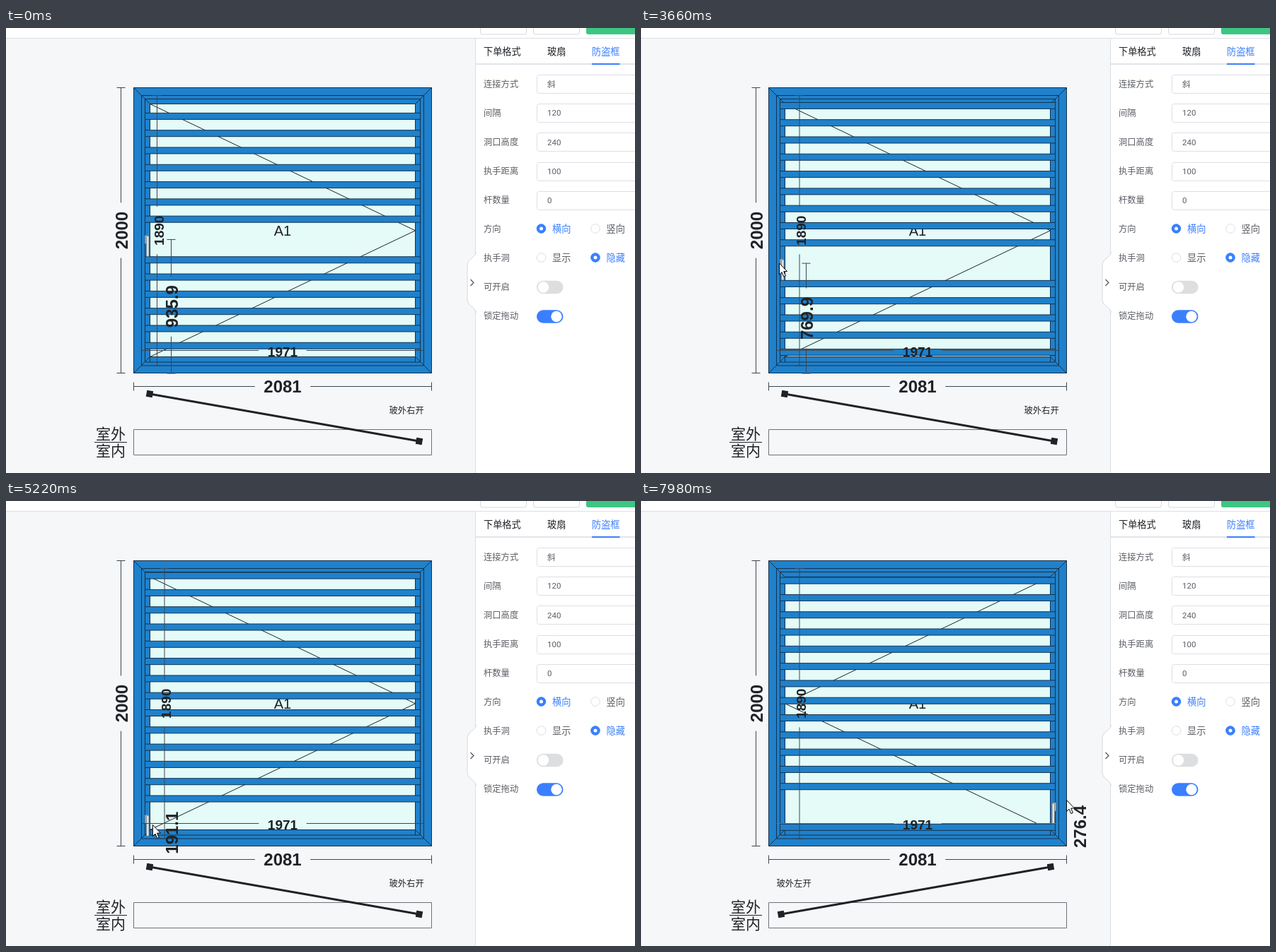
Animation, 889 px wide and 630 px high, one loop 8 s. Source, as an HTML page with a canvas:

```html
<!DOCTYPE html>
<html lang="zh">
<head>
<meta charset="utf-8">
<style>
html, body { margin: 0; width: 100%; height: 100%; overflow: hidden; background: #f6f7f9; }
canvas { display: block; }
</style>
</head>
<body>
<canvas id="stage" width="889" height="630"></canvas>
<script>
const ctx = document.getElementById('stage').getContext('2d');
const LOOP = 8000, STEP = 60;
const PX_PER_MM = 0.2025, BOTTOM = 489;
const PITCH = 120 * PX_PER_MM, BAR = 9;
const INK = '#1f2226', LINE = '#16324a', BLUE = '#1f81cc', GLASS = '#e4fbf8', ACCENT = '#3a7fff';
const DIGITS = '"Liberation Sans", Arial, sans-serif';
const CJK = '"Noto Sans CJK SC", "Noto Sans CJK", sans-serif';

// Keyframes: [time, value...]
const cursorKeys = [[120, 690, 87], [540, 400, 225], [900, 215, 300], [1380, 200, 300], [2400, 198, 301],
  [2880, 208, 305], [3000, 208, 305], [3240, 197, 320], [3420, 196, 323], [3660, 195, 332.5], [4140, 197, 372],
  [4740, 205, 427], [5040, 206, 446], [5460, 208, 474], [5880, 210, 479], [6540, 375, 479],
  [6720, 407, 479], [7560, 612, 480], [7980, 601, 423]];
const leftHeight = [[3360, 935.9], [3420, 841.5], [3660, 769.9], [4140, 590], [4740, 336.4], [5040, 243.2], [5460, 121.6]];
const rightHeight = [[7620, 112.3], [7980, 276.4]];
const bottomPivot = [[5520, 210], [5880, 211], [6540, 364.5], [6720, 395], [7560, 584]];
const dimensionX = [[1560, 213.5], [2460, 210], [2760, 210], [2820, 217], [2880, 224]];

function at(keys, t) {
  if (t <= keys[0][0]) return keys[0].slice(1);
  for (let i = 1; i < keys.length; i++) {
    const a = keys[i - 1], b = keys[i];
    if (t <= b[0]) {
      const k = (t - a[0]) / (b[0] - a[0]);
      return a.slice(1).map((v, j) => v + (b[j + 1] - v) * k);
    }
  }
  return keys[keys.length - 1].slice(1);
}

function path(points, { fill, stroke, width = 1, close = false } = {}) {
  ctx.beginPath();
  points.forEach(([x, y]) => ctx.lineTo(x, y));
  if (close) ctx.closePath();
  if (fill) { ctx.fillStyle = fill; ctx.fill(); }
  if (stroke) { ctx.strokeStyle = stroke; ctx.lineWidth = width; ctx.stroke(); }
}

function box(x, y, w, h, fill, stroke, radius = 0, width = 1) {
  ctx.beginPath();
  ctx.roundRect(x, y, w, h, radius);
  if (fill) { ctx.fillStyle = fill; ctx.fill(); }
  if (stroke) { ctx.strokeStyle = stroke; ctx.lineWidth = width; ctx.stroke(); }
}

function disc(x, y, r, fill, stroke) {
  ctx.beginPath();
  ctx.arc(x, y, r, 0, Math.PI * 2);
  ctx.fillStyle = fill;
  ctx.fill();
  if (stroke) { ctx.strokeStyle = stroke; ctx.lineWidth = 1; ctx.stroke(); }
}

function text(s, x, cy, size, { color = INK, family = CJK, weight = '', align = 'left' } = {}) {
  ctx.font = `${weight} ${size}px ${family}`;
  ctx.fillStyle = color;
  ctx.textAlign = align;
  ctx.fillText(s, x, cy + size * (family === CJK ? 0.38 : 0.36));
}

// Dimension line of given length along +x, with end ticks and a gap around its label.
function dimension(x, y, length, label, size, { vertical = false, color = '#3c4650', shift = 0, ticks = 6 } = {}) {
  ctx.save();
  ctx.translate(x, y);
  if (vertical) ctx.rotate(-Math.PI / 2);
  ctx.font = `bold ${size}px ${DIGITS}`;
  const textWidth = ctx.measureText(label).width;
  const arm = (length - textWidth) / 2 - 12.5;
  if (arm > 0) {
    path([[0, 0], [arm, 0]], { stroke: color });
    path([[length - arm, 0], [length, 0]], { stroke: color });
  }
  if (length > textWidth) {
    for (const end of [0, length]) path([[end, -ticks], [end, ticks]], { stroke: color });
  }
  text(label, length / 2, shift, size, { family: DIGITS, weight: 'bold', align: 'center' });
  ctx.restore();
}

function radio(x, y, label, on) {
  disc(x, y, 6.3, on ? ACCENT : '#fff', on ? ACCENT : '#dcdfe6');
  if (on) disc(x, y, 2.5, '#fff');
  text(label, x + 15.5, y, 13.2, { color: on ? ACCENT : '#5b5e64' });
}

function toggle(y, on) {
  box(750, y - 9.3, 37.5, 18.6, on ? ACCENT : '#dddee0', null, 9.3);
  disc(on ? 778 : 759.5, y, 7.7, '#fff');
}

function drawPanel() {
  box(0, 0, 889, 14, '#fff');
  box(664, 14, 225, 616, '#fff');
  path([[0, 14.5], [889, 14.5]], { stroke: '#dcdfe4' });
  path([[663.5, 14], [663.5, 630]], { stroke: '#dcdfe4' });
  box(670.5, -10, 65, 19, '#fff', '#d5d8de', 3);
  box(745.5, -10, 65, 19, '#fff', '#d5d8de', 3);
  box(820, -10, 90, 19, '#3cc682', null, 3);

  ctx.beginPath();
  ctx.moveTo(664.5, 317);
  ctx.bezierCurveTo(663, 326, 652, 326, 652, 336);
  ctx.lineTo(652, 384);
  ctx.bezierCurveTo(652, 394, 663, 394, 664.5, 403);
  ctx.fillStyle = '#fff';
  ctx.fill();
  ctx.strokeStyle = '#d5d8de';
  ctx.lineWidth = 1;
  ctx.stroke();
  path([[656.5, 356], [661, 360.5], [656.5, 365]], { stroke: '#50545a', width: 1.2 });

  text('下单格式', 675, 33, 13.2);
  text('玻扇', 765, 33, 13.2);
  text('防盗框', 828, 33, 13.2, { color: ACCENT });
  path([[664, 51], [889, 51]], { stroke: '#e1e4ea', width: 2 });
  box(828, 50, 39.5, 2, ACCENT);

  const labels = ['连接方式', '间隔', '洞口高度', '执手距离', '杆数量', '方向', '执手洞', '可开启', '锁定拖动'];
  labels.forEach((s, i) => text(s, 675, 79 + i * 41.1, 12.3, { color: '#5b5e64' }));
  ['斜', '120', '240', '100', '0'].forEach((s, i) => {
    const y = 79.2 + i * 41.1;
    box(750.5, Math.round(y - 13) + 0.5, 160, 26, '#fff', '#dcdfe6', 3);
    text(s, 765, y, 11.5, { color: '#5b5e64', family: i ? 'Roboto, sans-serif' : CJK });
  });
  radio(756.5, 284, '横向', true);
  radio(833, 284, '竖向', false);
  radio(756.5, 325, '显示', false);
  radio(833, 325, '隐藏', true);
  toggle(367, false);
  toggle(408.5, true);
}

function drawHandle(side, x, y) {
  ctx.save();
  ctx.translate(x, y);
  if (side === 'bottom') { ctx.rotate(-Math.PI / 2); ctx.scale(-1, 1); ctx.rotate(Math.PI); ctx.scale(-1, 1); }
  if (side === 'right') ctx.scale(-1, 1);
  box(-2.5, -6, 5, 12, '#b9bec3', '#6e7880', 1, 0.8);
  box(-0.5, -5, 3.5, 29, '#dfe3e5', '#6e7880', 1, 0.8);
  ctx.restore();
}

function drawWindow(side, handleY) {
  const [l, r, t, b] = [203.5, 578.5, 107.5, 465.5];
  const midX = 391, midY = 286.8;
  box(180.5, 84.5, 421, 404, BLUE, LINE);
  box(191.5, 95.5, 399, 382.5, null, LINE);
  box(196.5, 100.5, 389, 372.5, null, LINE);
  for (const [x, y, u, v] of [[180.5, 84.5, l, t], [601.5, 84.5, r, t], [180.5, 488.5, l, b], [601.5, 488.5, r, b]]) {
    path([[x, y], [u, v]], { stroke: LINE });
  }
  path([[l, b], [l, 473]], { stroke: LINE });
  path([[r, b], [r, 473]], { stroke: LINE });
  box(l, t, r - l, b - t, GLASS, LINE);

  const swing = {
    left: [[l, t], [r, midY], [l, b]],
    right: [[r, t], [l, midY], [r, b]],
    bottom: [[l, b], [midX, t], [r, b]]
  };
  path(swing[side], { stroke: INK });
  text('A1', midX, 287, 20, { family: DIGITS, align: 'center' });

  const bar = y => box(196.5, y, 389, BAR, BLUE, LINE);
  for (let y = handleY - PITCH; y > t; y -= PITCH) bar(y - BAR);
  for (let y = handleY + PITCH; y < b; y += PITCH) bar(y);
}

function drawPlan(side) {
  box(180.5, 568.5, 421, 36, null, '#6d7278');
  text('室外', 127, 574, 21);
  text('室内', 127, 598, 21);
  path([[125, 586.5], [171, 586.5]], { stroke: INK });
  const lines = {
    left: [[203, 518], [584, 585]],
    right: [[579, 518], [198, 585]],
    bottom: [[197.5, 586], [265, 545.5], [517, 545.5], [584.5, 586]]
  };
  const points = lines[side], first = points[0], last = points[points.length - 1];
  path(points, { stroke: INK, width: 3 });
  const angle = Math.atan2(last[1] - first[1], last[0] - first[0]);
  for (const [x, y] of [first, last]) {
    ctx.save();
    ctx.translate(x, y);
    ctx.rotate(angle);
    box(-4.5, -4.5, 9, 9, INK);
    ctx.restore();
  }
  if (side === 'left') text('玻外右开', 541.5, 541, 12.3);
  if (side === 'right') text('玻外左开', 191.5, 541, 12.3);
}

function drawCursor(x, y) {
  const shape = [[0, 0], [0, 16], [3.6, 12.7], [6.3, 19], [8.9, 17.9], [6.2, 11.7], [11, 11.5]];
  path(shape.map(([u, v]) => [x + u + 0.5, y + v + 0.5]), { fill: '#fff', stroke: '#000', close: true });
}

function draw(t) {
  const side = t < 5520 ? 'left' : t < 7620 ? 'bottom' : 'right';
  const height = side === 'left' ? at(leftHeight, t)[0] : side === 'right' ? at(rightHeight, t)[0] : 85;
  const handleY = BOTTOM - height * PX_PER_MM;
  const pivot = side === 'left' ? 199 : side === 'right' ? 584 : at(bottomPivot, t)[0];

  ctx.clearRect(0, 0, 889, 630);
  box(0, 0, 889, 630, '#f6f7f9');
  drawPanel();
  drawWindow(side, handleY);
  drawHandle(side, pivot, side === 'bottom' ? 470 : handleY);
  drawPlan(side);

  dimension(162.5, 488.5, 404, '2000', 24, { vertical: true, shift: 0.5 });
  dimension(180.5, 507.5, 421, '2081', 24);
  dimension(191.5, 456.5, 399, '1971', 19, { shift: 1.5, ticks: 0, color: t >= 7740 ? '#85695a' : '#3c4650' });
  dimension(at(dimensionX, t)[0], 478, 382.5, '1890', 19, { vertical: true, shift: 2.5 });
  dimension(pivot + (side === 'left' ? 34.5 : 36), BOTTOM, BOTTOM - handleY,
    String(Math.round(height * 10) / 10), 24, { vertical: true, shift: 0.5 });

  if (t >= 120) drawCursor(...at(cursorKeys, t));
}

function tick() {
  const t = performance.now() % LOOP;
  draw(Math.floor(t / STEP) * STEP);
  requestAnimationFrame(tick);
}
tick();
</script>
</body>
</html>
```
